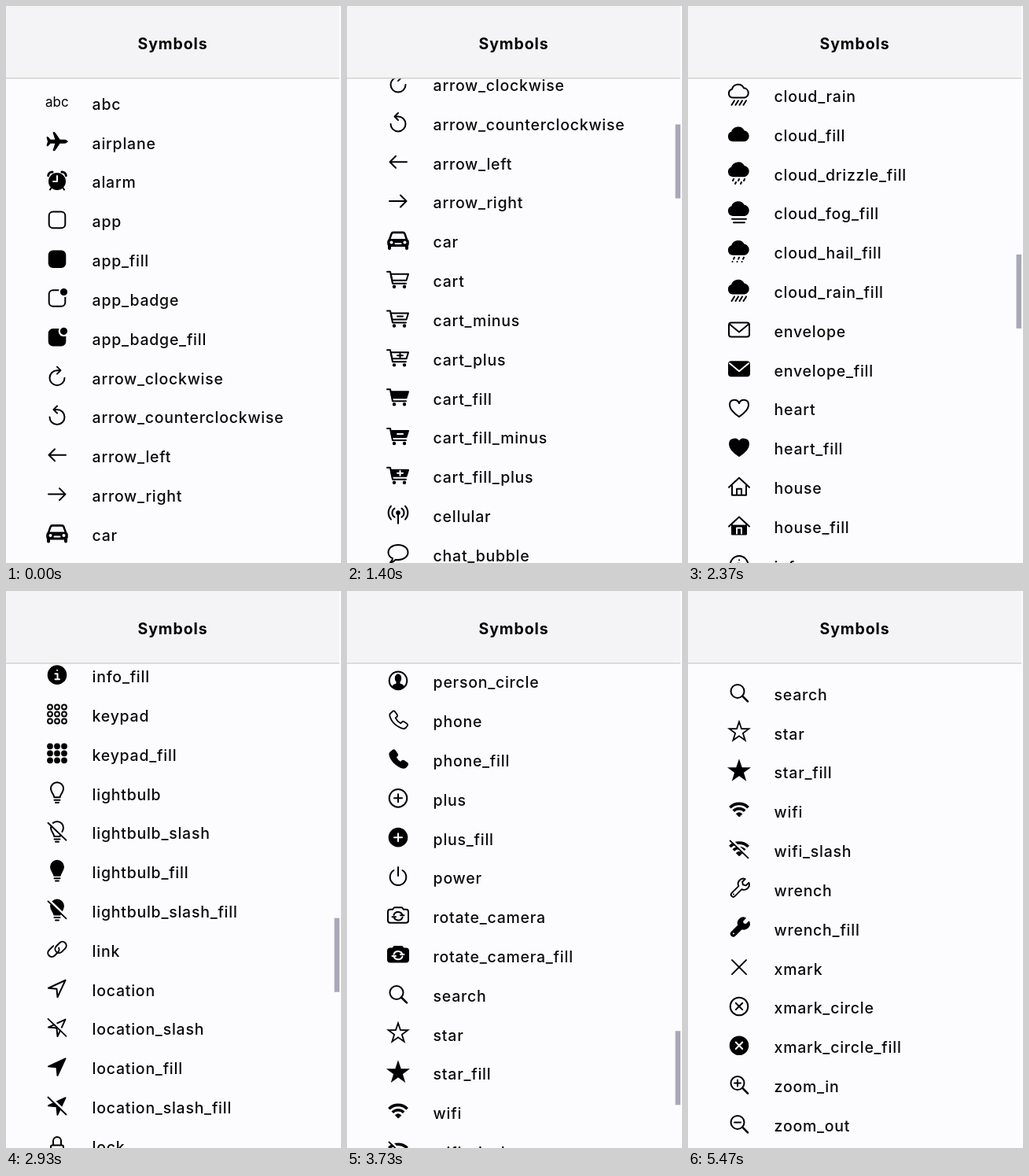
Recreate the animation shown at these times as an HTML page. Size 426x708 px, loop 5.51 s.

```html
<!DOCTYPE html>
<html lang="en">
<head>
<meta charset="utf-8">
<title>Symbols</title>
<style>
html, body { margin: 0; width: 100%; height: 100%; overflow: hidden; background: #fcfcff; }
svg { display: block; font-family: Inter, Roboto, sans-serif; }
.icon { fill: none; stroke: #000; stroke-width: 2; stroke-linecap: round; stroke-linejoin: round; }
.label { font-size: 19.5px; font-weight: 500; letter-spacing: .75px; fill: #0a0a0a; }
.title { font-size: 19.5px; font-weight: 700; letter-spacing: .9px; }
.solid { fill: #000; }
.cut { stroke: #fcfcff; }
.hole { fill: #fcfcff; stroke: none; }
.filled .body { fill: #000; }
.filled .detail { stroke: #fcfcff; }
</style>
</head>
<body>
<svg width="426" height="708" viewBox="0 0 426 708">
  <g id="list"></g>
  <rect id="bar" x="417.5" y="94" width="6.5" height="94" fill="#a9a8b8"/>
  <rect width="424" height="92" fill="#f4f4f6"/>
  <rect y="91" width="424" height="1.5" fill="#d3d3cc"/>
  <text class="title" x="167.5" y="55">Symbols</text>
</svg>
<script>
const names = `abc airplane alarm app app_fill app_badge app_badge_fill
arrow_clockwise arrow_counterclockwise arrow_left arrow_right car
cart cart_minus cart_plus cart_fill cart_fill_minus cart_fill_plus cellular
chat_bubble chat_bubbles chat_bubble_fill chat_bubbles_fill clock clock_fill
cloud cloud_drizzle cloud_fog cloud_hail cloud_rain
cloud_fill cloud_drizzle_fill cloud_fog_fill cloud_hail_fill cloud_rain_fill
envelope envelope_fill heart heart_fill house house_fill info info_fill
keypad keypad_fill lightbulb lightbulb_slash lightbulb_fill lightbulb_slash_fill link
location location_slash location_fill location_slash_fill
lock lock_slash lock_fill lock_slash_fill minus minus_fill person person_circle
phone phone_fill plus plus_fill power rotate_camera rotate_camera_fill search
star star_fill wifi wifi_slash wrench wrench_fill
xmark xmark_circle xmark_circle_fill zoom_in zoom_out`.split(/\s+/);

// Shape helpers; every icon is drawn around (0, 0)
const path = (d, cls = '', more = '') => `<path class="${cls}" d="${d}" ${more}/>`;
const circle = (x, y, r, cls = '') => `<circle class="${cls}" cx="${x}" cy="${y}" r="${r}"/>`;
const rect = (x, y, w, h, rx, cls = '') =>
  `<rect class="${cls}" x="${x}" y="${y}" width="${w}" height="${h}" rx="${rx}"/>`;
const group = (transform, content) => `<g transform="${transform}">${content}</g>`;
const body = d => path(d, 'body');
const detail = d => path(d, 'detail');
const disc = circle(0, 0, 11.3, 'body');
const app = rect(-10.3, -10.3, 20.6, 20.6, 5, 'body');

const turn = path('M9.5 1.5A9.5 9.5 0 1 1 0-8H4M0-12.5L4.5-8L0-3.5');
const arrow = path('M11 0H-10.5M-3-7.5L-10.5 0L-3 7.5');
const cart = path('M-14-10H-10L-7 5H10') + body('M-9.3-7H13L10.5 1H-7.6Z') +
  circle(-5, 9, 1.2, 'solid') + circle(8, 9, 1.2, 'solid');
const bubblePath = 'M-7 5.6C-10.5 4-12.5 1-12.5-2C-12.5-7.5-7-11.5 0-11.5S12.5-7.5 12.5-2S7 7.5 0 7.5Q-1.5 7.5-3 7.2Q-6 10.5-10 11Q-7 8.5-7 5.6Z';
const bubbles = group('translate(3 1.5) scale(.75)', body(bubblePath.replace('Q-6 10.5-10 11Q-7 8.5', 'L-5 7L'))
    + body('M5 6Q7 10 11 11Q8.5 8 9 4')) +
  group('translate(-2.5 -1.5) scale(.75)', path(bubblePath, 'cut', 'fill="#fcfcff" stroke-width="6"') +
    path(bubblePath, 'body', 'stroke-width="2.6"'));
const cloud = group('translate(0 1)', body('M-8 8a5.5 5.5 0 0 1-1-10.8A8 8 0 0 1 6-4.2A6.2 6.2 0 0 1 7 8Z'));
const weather = d => group('translate(0 -5)', cloud) + group('translate(0 .8)', path(d));
const search = circle(-2, -2, 8.5) + path('M4.3 4.3L11 11', '', 'stroke-width="2.6"');
const slash = path('M-8.8-11.5L13.8 10.1', 'cut', 'stroke-width="2.6"') +
  path('M-11.5-11.2L11.5 10.8', '', 'stroke-width="1.8"');
const chainLink = x => rect(x, -5, 16, 10, 5);

const star = Array.from({ length: 10 }, (_, i) => {
  const r = i % 2 ? 5.1 : 13, a = i * Math.PI / 5;
  return `${(r * Math.sin(a)).toFixed(2)} ${(-r * Math.cos(a)).toFixed(2)}`;
}).join('L');

const keys = [-9, 0, 9].flatMap(y => [-9, 0, 9].map(x => circle(x, y, 2.9, 'body'))).join('');
const wave = (r, w) => {
  const x = r * Math.SQRT1_2, y = 8 - x;
  return path(`M${-x} ${y}A${r} ${r} 0 0 1 ${x} ${y}`, '', `stroke-width="${w}" stroke-linecap="butt"`);
};

const icons = {
  abc: '<text x="-15" y="5.5" font-size="17" fill="#000" stroke="none">abc</text>',
  airplane: path('M13 0C13-1.3 11-2 9-2H3.5L-3-11.5H-5L-2-2H-8.5L-11.5-5.5H-13L-11.5 0L-13 5.5H-11.5L-8.5 2H-2L-5 11.5H-3L3.5 2H9C11 2 13 1.3 13 0Z', 'solid', 'stroke-width="1"'),
  alarm: circle(0, 1, 10, 'solid') + path('M-11.3-6.5A5 5 0 0 1-6-11M11.3-6.5A5 5 0 0 0 6-11', '', 'stroke-width="3"') +
    path('M-7 8.5L-9 11.5M7 8.5L9 11.5') + path('M0-6V1H-5', 'cut'),
  app,
  app_badge: app + circle(8.5, -8, 6.8, 'hole') + circle(8.5, -8, 3.6, 'solid'),
  arrow_clockwise: turn,
  arrow_counterclockwise: group('scale(-1 1)', turn),
  arrow_left: arrow,
  arrow_right: group('scale(-1 1)', arrow),
  car: path('M-11-1L-8.4-8.5Q-7.8-10-6-10H6Q7.8-10 8.4-8.5L11-1', '', 'stroke-width="2.6"') +
    rect(-12.8, -1, 25.6, 8, 3, 'solid') + path('M-11 7V10M11 7V10', '', 'stroke-width="4"') +
    circle(-8.5, 2.5, 2, 'hole') + circle(8.5, 2.5, 2, 'hole') + path('M-3.5 4H3.5', 'cut'),
  cart,
  cart_minus: cart + detail('M-1-3H6'),
  cart_plus: cart + detail('M-1-3H6M2.5-6V0'),
  cellular: circle(0, -2.5, 1.8, 'solid') + path('M0-1V11M-4.5 3A6.5 6.5 0 0 1-4.5-8M4.5 3A6.5 6.5 0 0 0 4.5-8M-9 6A12.5 12.5 0 0 1-9-11M9 6A12.5 12.5 0 0 0 9-11'),
  chat_bubble: body(bubblePath),
  chat_bubbles: bubbles,
  clock: disc + detail('M0-7V0H-5.5'),
  cloud,
  cloud_drizzle: weather('M-7 7L-8 9M0 7L-1 9M7 7L6 9M-4 11L-5 13M3 11L2 13'),
  cloud_fog: weather('M-9 8H9M-7 12.5H7'),
  cloud_hail: weather('M-6 7L-7 9M0 7L-1 9M6 7L5 9M-8.5 12.5h.1M-2.5 12.5h.1M3.5 12.5h.1'),
  cloud_rain: weather('M-6 7L-9.5 12.5M-1 7L-4.5 12.5M4 7L.5 12.5M9 7L5.5 12.5'),
  envelope: rect(-13, -9, 26, 18, 3, 'body') + detail('M-12-7L0 3L12-7'),
  heart: body('M0 11C-6 7-12 2-12-4C-12-12-2-12 0-6C2-12 12-12 12-4C12 2 6 7 0 11Z'),
  house: body('M-9-1V11H9V-1') + path('M-13 1L0-11L13 1') + detail('M-3 10V3H3V10'),
  info: disc + detail('M0-6h.1M-2.5-1.5H.5V5.5M-2.5 5.5H3'),
  keypad: keys,
  lightbulb: body('M-3.7 6C-3.7 3-8-.5-8-5A8 8 0 0 1 8-5C8-.5 3.7 3 3.7 6Z') + path('M-3.5 9.5H3.5M-2 12.8H2'),
  link: group('rotate(-45)', group('translate(0 -1.5)', chainLink(-13)) +
    group('translate(0 1.5)', path('M2-5H5', 'cut', 'stroke-width="6"') + chainLink(-3))),
  location: body('M10.5-10.5L-11-.5L-.5 .5L.5 11Z'),
  lock: rect(-8, 0, 16, 12, 2, 'body') + path('M-5-1V-5.5a5 5 0 0 1 10 0V-1'),
  minus: disc + detail('M-5 0H5'),
  person: circle(0, -6, 5) + path('M-10 11Q-10 3 0 3T10 11Z'),
  person_circle: circle(0, 0, 11.3) + '<ellipse class="solid" cy="-3" rx="3.2" ry="4.6"/>' +
    path('M-8 8Q-7 5-2 4V0H2V4Q7 5 8 8Q4 11.5 0 11.5Q-4 11.5-8 8Z', 'solid', 'stroke-width="1"'),
  phone: group('scale(.92)', body('M-10-9.5l3-2.5q1.5-.8 2.6.6l3.2 4.6q.8 1.4-.4 2.5l-2 1.8q2.4 5 7.2 7.4l1.9-2q1.1-1.1 2.5-.3l4.4 3q1.4 1.1.5 2.6l-2.4 3q-3 2.6-9.5-1.3q-9-5-12-13.4q-1.6-4.4 1-6z')),
  plus: disc + detail('M-5 0H5M0-5V5'),
  power: path('M-5.5-8A10.3 10.3 0 1 0 5.5-8M0-12V-1'),
  rotate_camera: body('M-13-5q0-3 3-3h3l2-2.5h10l2 2.5h3q3 0 3 3v11q0 3-3 3h-20q-3 0-3-3z') +
    detail('M-5.5-1A5.8 5.8 0 0 1 5.5-.5M5.5 2A5.8 5.8 0 0 1-5.5 1.5M3-.5H7.5M-7.5 1.5H-3'),
  search,
  star: path(`M${star}Z`, 'body', 'stroke-linejoin="miter" stroke-width="1.8"'),
  wifi: wave(16.5, 3.6) + wave(10.2, 3.6) + path('M0 8L-3.6 4.4A5 5 0 0 1 3.6 4.4Z', 'solid', 'stroke-width="1"'),
  wrench: group('rotate(45) scale(.95)', body('M-3-2A7 7 0 0 1-3.5-15V-9.5L0-7.5L3.5-9.5V-15A7 7 0 0 1 3-2V11A3 3 0 0 1-3 11Z') +
    detail('M0 10.5h.1')),
  xmark: path('M-9-9L9 9M9-9L-9 9'),
  xmark_circle: disc + detail('M-4.2-4.2L4.2 4.2M4.2-4.2L-4.2 4.2'),
  zoom_in: search + path('M-6-2H2M-2-6V2'),
  zoom_out: search + path('M-6-2H2')
};

const pitch = 49.82;
const list = document.getElementById('list');
const bar = document.getElementById('bar');

list.innerHTML = names.map((name, i) => {
  const icon = icons[name.replace('_fill', '').replace('_slash', '')];
  const cls = name.includes('_fill') ? 'icon filled' : 'icon';
  return group(`translate(0 ${(122.4 + i * pitch).toFixed(2)})`,
    `<g class="${cls}" transform="translate(65 0)">${icon}${name.includes('_slash') ? slash : ''}</g>` +
    `<text class="label" x="109.6" y="9.4">${name}</text>`);
}).join('');

// Scroll keys: time (ms), offset (px), speed (px/ms)
const loop = 5510, end = 3430.6, arrive = 4240;
const track = [
  [850, 0, 0], [970, 28.5, .55], [1870, 882.8, 1.12],
  [2930, 2107, 1.17], [3730, 3046.5, 1.04], [arrive, end, .49]
];

function scrollAt(t) {
  if (t <= track[0][0]) return 0;
  if (t >= arrive) {
    const d = t - arrive;
    return end + .49 * d * Math.exp(-d / 100);
  }
  const i = track.findIndex(k => k[0] > t);
  const [t0, y0, v0] = track[i - 1], [t1, y1, v1] = track[i];
  const h = t1 - t0, u = (t - t0) / h, w = 1 - u;
  return w * w * ((1 + 2 * u) * y0 + u * h * v0) + u * u * ((3 - 2 * u) * y1 - w * h * v1);
}

const ramp = (t, from, to) => Math.min(1, Math.max(0, (t - from) / (to - from)));

function draw(now) {
  const t = now % loop, y = scrollAt(t);
  list.setAttribute('transform', `translate(0 ${-y.toFixed(2)})`);
  bar.setAttribute('y', 93.6 + Math.min(y, end) * .1528);
  bar.setAttribute('opacity', ramp(t, 850, 950) * (1 - ramp(t, 5130, 5430)));
}

const start = performance.now();
function tick() {
  draw(performance.now() - start);
  requestAnimationFrame(tick);
}
tick();
</script>
</body>
</html>
```
